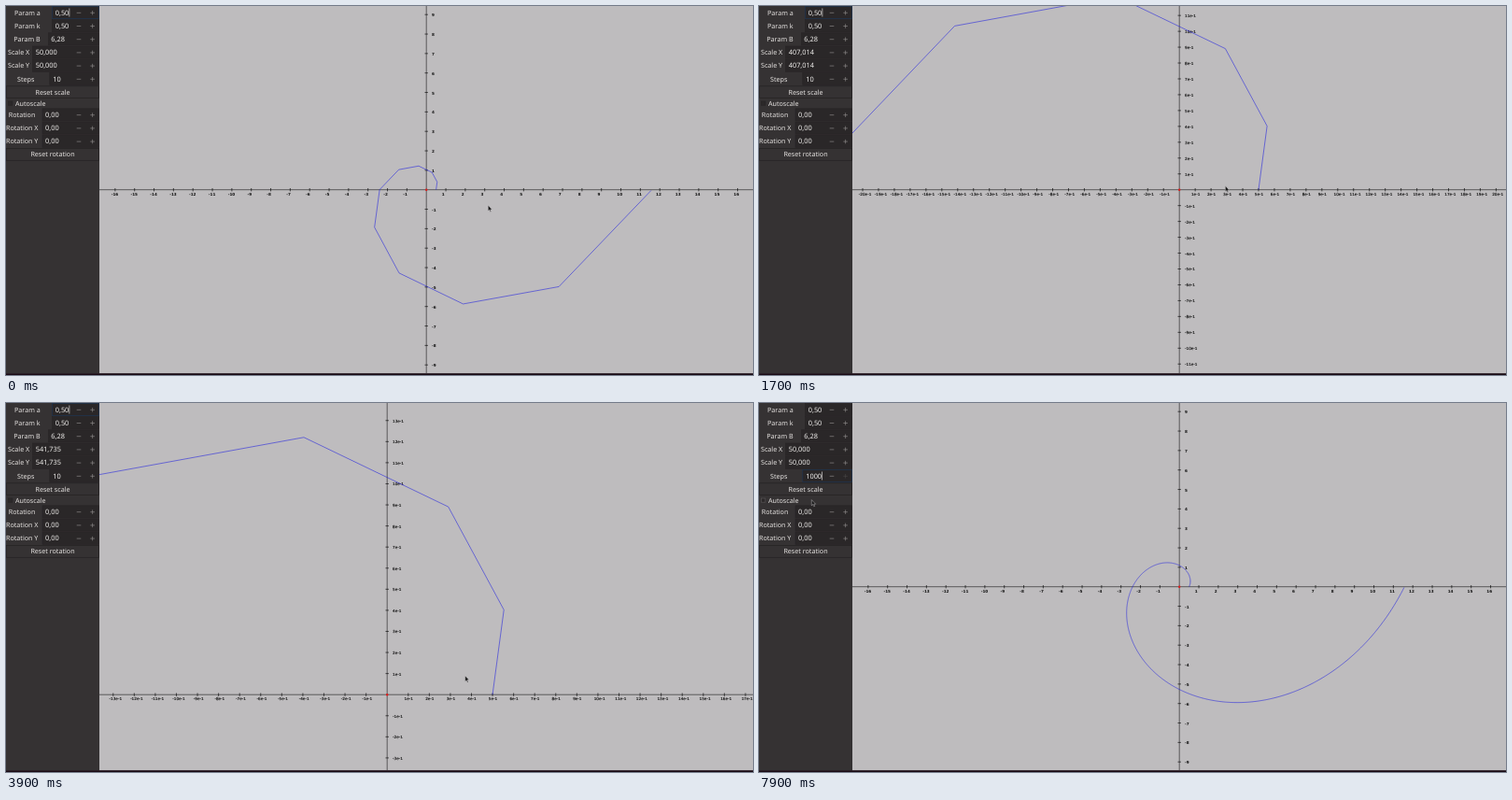
An HTML page that plays this animation: 800x395 px, repeating every 8 s.

```html
<!DOCTYPE html>
<html lang="en">
<head>
<meta charset="utf-8">
<title>Spiral plotter</title>
<style>
  html, body { margin: 0; width: 100%; height: 100%; overflow: hidden; background: #bebcbe; }
  svg { display: block; }
  text { white-space: pre; text-rendering: geometricPrecision; }
  .panel text { font: 7.15px "Noto Sans", "Open Sans", sans-serif; fill: #e6e3e1; }
  .panel .value { font-size: 7.4px; fill: #f0eeec; }
  .entry { fill: #2a2728; stroke: #262324; stroke-width: .5; }
  .focus { stroke: #1d3350; stroke-width: .7; }
  .button { fill: #353233; stroke: #242122; stroke-width: .7; }
  .pressed { fill: #292627; }
  .sign { stroke: #979494; stroke-width: .6; fill: none; }
  .dim { stroke: #4a4748; }
  .plot text { font: 4.17px "DejaVu Sans", sans-serif; fill: #111; stroke: #111; stroke-width: .14; }
  .plot .bold { font-weight: bold; stroke: none; }
  .axis { stroke: #151515; stroke-width: .6; fill: none; }
  .tick { stroke: #111; stroke-width: .7; fill: none; }
  .curve { stroke: #1c1ce0; stroke-width: .55; fill: none; }
</style>
</head>
<body>
<svg width="800" height="395" viewBox="0 0 800 395">
  <defs><clipPath id="area"><rect x="100" width="700" height="393"/></clipPath></defs>
  <rect width="800" height="395" fill="#bebcbe"/>
  <g class="plot" id="plot" clip-path="url(#area)"></g>
  <g class="panel" id="panel"><rect width="100" height="393.5" fill="#353233"/></g>
  <rect id="caret" width=".6" height="9" fill="#f4f2f0"/>
  <rect y="393.2" width="800" height="1.8" fill="#190a14"/>
  <path id="arrow" d="M0 0V6.2L1.4 4.9 2.5 7.2 3.4 6.8 2.4 4.6H4.3Z" fill="#181818" stroke="#dedcde" stroke-width=".4"/>
  <path id="beam" d="M-1-3H1M0-3V3M-1 3H1" fill="none" stroke="#d8d6d6" stroke-width=".6"/>
</svg>
<script>
const LOOP = 8000, FRAME = 100;
const CENTER = [450.2, 196.7];
const RESET = 5000, CLICK = 5900, ENTER = 6900;
const $ = id => document.getElementById(id);

// Keys are [time, ...values], joined by straight lines.
const zoomKeys = [[0, 0], [800, 8], [900, 8], [1300, 16], [1400, 16], [1700, 22], [2000, 25]];
const panKeys = [[2200, ...CENTER], [2400, 437.6, 212.5], [3000, 410, 306], [3400, 408.2, 312.2]];
const mouseKeys = [
  [0, 516.3, 213.3], [700, 471, 199.6], [1000, 472, 199], [1700, 499.4, 192.6],
  [2000, 506, 190], [2200, 531, 182], [2400, 518.5, 197.2], [3000, 493, 287],
  [3400, 491.7, 292], [4000, 491.7, 292], [4900, 48.3, 92], [5100, 48.3, 92],
  [5800, 61, 78], [7400, 61, 78], [7900, 56.3, 103.6]
];

function sample(keys, t) {
  const i = keys.findIndex(k => k[0] > t);
  if (i === 0) return keys[0].slice(1);
  if (i < 0) return keys[keys.length - 1].slice(1);
  const a = keys[i - 1], b = keys[i], u = (t - a[0]) / (b[0] - a[0]);
  return a.slice(1).map((v, j) => v + (b[j + 1] - v) * u);
}

// Panel: label, label x, entry x, value x, value
const rows = [
  ["Param a", 9, 49.5, 52.7, "0,50"],
  ["Param k", 9, 49.5, 52.7, "0,50"],
  ["Param B", 8.3, 45.5, 48.3, "6,28"],
  ["Scale X", 2, 28.5, 31.7, "50,000"],
  ["Scale Y", 2, 28.5, 31.7, "50,000"],
  ["Steps", 12, 46.8, 50.2, "10"],
  ["Rotation", 2.8, 39, 42, "0,00"],
  ["Rotation X", 0, 39, 42, "0,00"],
  ["Rotation Y", 0, 39, 42, "0,00"]
];
const rowY = i => i < 6 ? 7 + 14.2 * i : 116.4 + 14.2 * (i - 6);

function button(id, label, y) {
  return `<rect class="button" id="${id}" x=".4" y="${y - 6.4}" width="99.2" height="12.8"/>
    <text x="50" y="${y + 2.5}" text-anchor="middle">${label}</text>`;
}

$("panel").insertAdjacentHTML("beforeend", rows.map(([label, lx, ex, vx, value], i) => {
  const y = rowY(i);
  return `<text x="${lx}" y="${y + 2.5}">${label}</text>
    <rect class="entry" id="entry${i}" x="${ex}" y="${y - 6.6}" width="${99.6 - ex}" height="13.2"/>
    <text class="value" id="value${i}" x="${vx}" y="${y + 2.6}">${value}</text>
    <path class="sign" d="M75.7 ${y + .3}h4.6"/>
    <path class="sign" id="plus${i}" d="M90.3 ${y + .3}h4.6m-2.3-2.3v4.6"/>`;
}).join("") + button("reset", "Reset scale", 92.2) + button("unrotate", "Reset rotation", 158.9) +
  `<rect id="check" x="2.6" y="102" width="4.2" height="4.2" fill="#2c292a" stroke="#262324" stroke-width=".6"/>
   <text x="10" y="106.6">Autoscale</text>`);

function spiral(steps, point) {
  const pts = [];
  for (let i = 0; i <= steps; i++) {
    const phi = 6.28 * i / steps, r = .5 * Math.exp(.5 * phi);
    pts.push(point(r * Math.cos(phi), r * Math.sin(phi)).map(v => v.toFixed(2)).join());
  }
  return pts.join(" ");
}

function drawPlot(scale, [ox, oy], steps) {
  const unit = scale / 2.4, fine = scale >= 250, gap = fine ? unit / 10 : unit;
  const cls = fine ? "" : ' class="bold"';
  let ticks = "", labels = "";
  const label = (x, y, k) => labels += `<text${cls} x="${x}" y="${y}">${k}${fine ? "e-1" : ""}</text>`;
  for (let k = Math.ceil((100 - ox) / gap); ox + k * gap < 800; k++) {
    if (!k) continue;
    const x = ox + k * gap;
    ticks += `M${x} ${oy - 1.7}v3.4`;
    label(x - 4.2, oy + 5.8, k);
  }
  for (let k = Math.ceil((oy - 394) / gap); oy - k * gap > 0; k++) {
    if (!k) continue;
    const y = oy - k * gap;
    ticks += `M${ox - 1.7} ${y}h3.4`;
    label(ox + 5.8, y + 2, k);
  }
  $("plot").innerHTML = `<path class="axis" d="M100 ${oy}H800M${ox} 0V393"/>
    <path class="tick" d="${ticks}"/>${labels}
    <polyline class="curve" points="${spiral(steps, (x, y) => [ox + x * unit, oy - y * unit])}"/>
    <circle cx="${ox}" cy="${oy}" r="1.2" fill="#e01c1c"/>`;
}

function place(id, x, y, shown) {
  $(id).setAttribute("transform", `translate(${x} ${y})`);
  $(id).style.display = shown ? "" : "none";
}

function render(t) {
  const zoomed = t < RESET;
  const scale = 50 * 1.1 ** (zoomed ? Math.round(sample(zoomKeys, t)[0]) : 0);
  drawPlot(scale, zoomed ? sample(panKeys, t) : CENTER, t < ENTER ? 10 : 1000);

  const scaleText = scale.toFixed(3).replace(".", ",");
  $("value3").textContent = $("value4").textContent = scaleText;
  const typed = t < 6400 ? "10" : t < 6600 ? "100" : "1000";
  $("value5").textContent = typed;
  $("plus5").classList.toggle("dim", t >= ENTER);
  $("entry0").classList.toggle("focus", zoomed);
  $("entry5").classList.toggle("focus", t >= CLICK);
  $("reset").classList.toggle("pressed", t >= 4900 && t < 5400);
  $("check").setAttribute("stroke", t >= 7800 ? "#5a5758" : "#262324");

  const blink = t % 1200;
  if (zoomed) place("caret", 67.6, 2.5, blink < 600 || blink >= 1000);
  else place("caret", 50.4 + 4.23 * typed.length, 73.5, t >= CLICK && (t < 7400 || t >= 7800));

  const [mx, my] = sample(mouseKeys, t);
  place("arrow", mx, my, t < 5800 || t >= 7400);
  place("beam", mx, my, t >= 5800 && t < 6400);
}

const start = performance.now();
let shown = -1;
function loop() {
  const t = Math.floor((performance.now() - start) % LOOP / FRAME) * FRAME;
  if (t !== shown) render(shown = t);
  requestAnimationFrame(loop);
}
loop();
</script>
</body>
</html>
```
